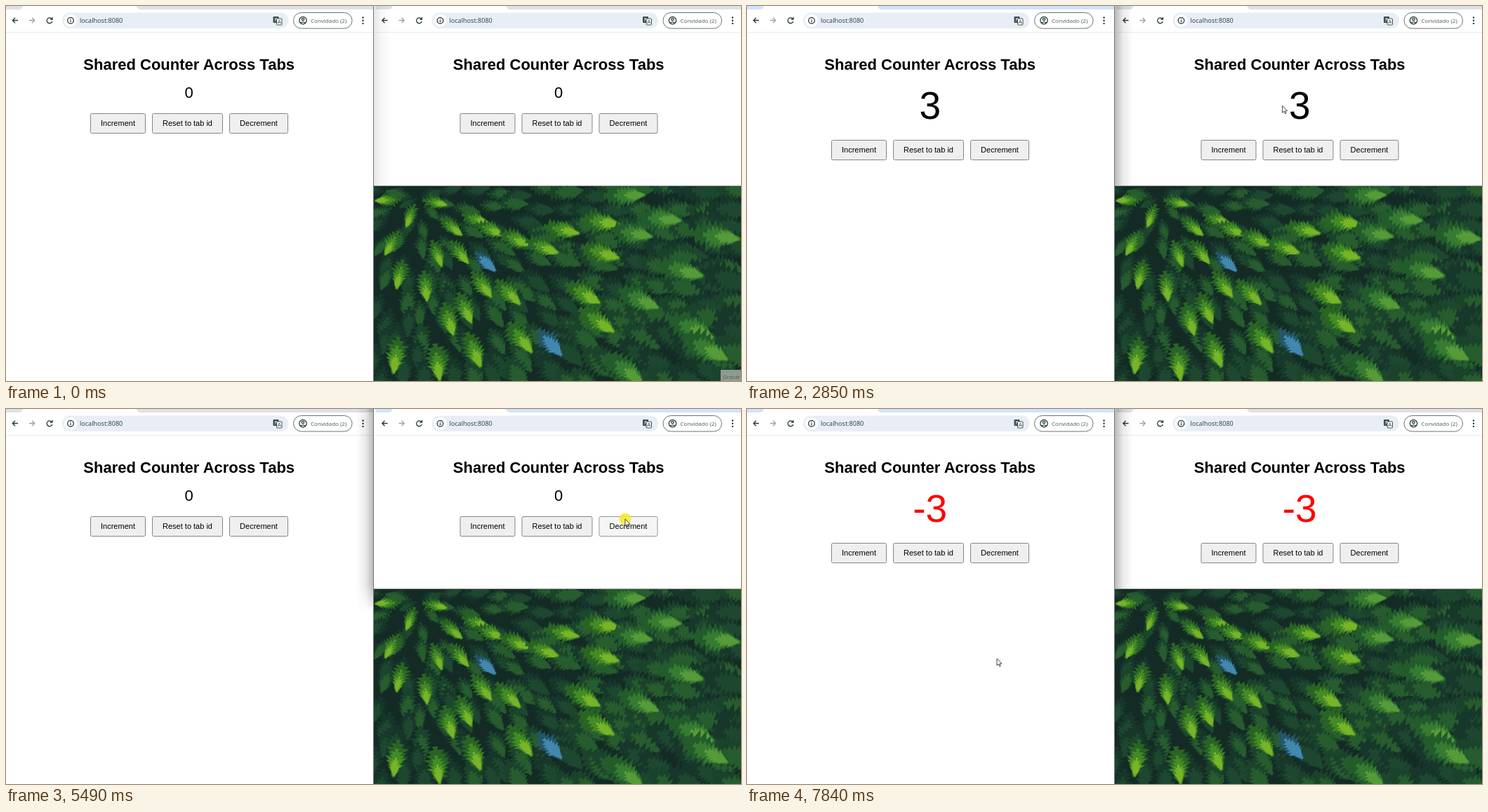
An HTML page for the animation above (8000 ms loop, 1047x535 px).

```html
<!DOCTYPE html>
<html lang="en">
<head>
<meta charset="utf-8">
<title>Shared Counter Across Tabs</title>
<style>
html, body { margin: 0; width: 100%; height: 100%; overflow: hidden; background: #fff }
svg { display: block }
.page { font-family: "Liberation Sans", Arial, sans-serif; text-anchor: middle }
.bar { font-family: "Open Sans", "Noto Sans", sans-serif }
.line { fill: none; stroke: #243b37; stroke-width: 1.3 }
.btn rect { fill: #efefef; stroke: #858585 }
.btn.hover rect { fill: #e4e4e4; stroke: #5c5c5c }
.btn.down rect { fill: #f5f5f5; stroke: #9a9a9a }
</style>
</head>
<body>
<svg id="stage" width="1047" height="535" viewBox="0 0 1047 535"></svg>
<script>
const LOOP = 8000, SHIFT = 526.5;
const stage = document.getElementById('stage');
const $ = id => document.getElementById(id);

// Pointer path: time, x, y
const path = [
  [0, 1052, 540], [70, 1036, 522], [480, 94, 205], [820, 136, 174],
  [1700, 136, 174], [2100, 140, 185], [2640, 140, 185], [2850, 762, 142],
  [2980, 853, 172], [3180, 853, 172], [3320, 886, 197], [3800, 886, 195],
  [3910, 886, 160], [4050, 886, 160], [4240, 902, 192], [4440, 904, 206],
  [4500, 904, 206], [4750, 888, 174], [5150, 888, 174], [5420, 882, 157],
  [5640, 882, 157], [5890, 888, 178], [6230, 888, 178], [6490, 889, 200],
  [7220, 889, 200], [7600, 356, 356], [8000, 356, 356]
];
// Button presses: down, up, counter change
const presses = [
  [890, 1020, 1], [1560, 1690, 1], [2300, 2440, 1], [3320, 3450, -1],
  [4240, 4370, -1], [4820, 4940, -1], [5480, 5620, -1], [6050, 6160, -1],
  [6750, 6890, -1], [7680, 7800, 0]
];
const hovers = {
  L0: [[660, 2710]],
  R2: [[3230, 3860], [4110, 4520], [4640, 7290]]
};
const within = (t, spans) => spans.some(([a, b]) => t >= a && t < b);

function pointerAt(t) {
  const i = Math.max(1, path.findIndex(p => p[0] > t));
  const [t0, x0, y0] = path[i - 1], [t1, x1, y1] = path[i];
  const k = (t - t0) / (t1 - t0);
  return [x0 + (x1 - x0) * k, y0 + (y1 - y0) * k];
}

function browser(id, x) {
  const buttons = [['Increment', 120.5, 78], ['Reset to tab id', 208.5, 100], ['Decrement', 318.5, 83]];
  return `<g transform="translate(${x})">
  <g id="strip${id}"><path d="M0 0H25Q23 0 23 2T19 5H0zM186 0H523V5H192Q187 5 186 0z"/></g>
  <path d="M0 37.5H523" stroke="#e8eaed"/>
  <g class="bar">
    <path class="line" d="M17 20.5H9.5M13 16.8L9.3 20.5L13 24.2"/>
    <path class="line" style="stroke:#9aa5a3" d="M33 20.5H40.5M37 16.8L40.7 20.5L37 24.2"/>
    <path class="line" d="M65.3 18.6A3.9 3.9 0 1 0 65.8 22M66 16V19.2H62.8"/>
    <rect x="80" y="9.5" width="322.5" height="22.5" rx="11.2" fill="#e9eef6"/>
    <circle cx="92" cy="20.7" r="9" fill="#fff"/>
    <circle class="line" cx="92" cy="20.7" r="4.3"/>
    <path class="line" d="M92 20.2V23.1M92 18.2V19.3"/>
    <text x="105" y="24.3" font-size="9.1" fill="#24403a">localhost:8080</text>
    <rect x="380.5" y="15" width="8" height="9" rx="1" fill="#3c504c"/>
    <rect x="385.5" y="18" width="7.5" height="9" rx="1" fill="#fff" stroke="#3c504c"/>
    <path d="M382.5 18.2H386.5M384.5 17V18.2Q384.5 21 382.5 22" fill="none" stroke="#fff" stroke-width=".8"/>
    <path d="M387 25L389.3 20L391.6 25M388 23.5H390.6" fill="none" stroke="#3c504c" stroke-width=".8"/>
    <rect x="409.5" y="9.5" width="83.5" height="22.5" rx="11.2" fill="#fff" stroke="#69756f"/>
    <g class="line"><circle cx="423" cy="20.6" r="5.2"/><circle cx="423" cy="19" r="1.7"/>
      <path d="M419.3 24.3Q423 21.4 426.7 24.3"/></g>
    <text x="434" y="23.7" font-size="8" fill="#4c5a56">Convidado (2)</text>
    ${[16.5, 20.7, 24.9].map(y => `<circle cx="508.5" cy="${y}" r="1.2" fill="#243b37"/>`).join('')}
  </g>
  <g class="page">
    <text x="260.7" y="91.3" font-size="22" font-weight="bold">Shared Counter Across Tabs</text>
    <text id="num${id}" x="260.7"></text>
    <g id="row${id}">${buttons.map(([label, bx, w], i) => `<g class="btn" id="${id}${i}">
      <rect x="${bx}" y="153.5" width="${w}" height="28" rx="2"/>
      <text x="${bx + w / 2}" y="170.7" font-size="11">${label}</text></g>`).join('')}</g>
  </g></g>`;
}

// Simplified forest seen from above: flat conifers leaning away from one point
function forest() {
  let seed = 11;
  const rnd = () => (seed = seed * 16807 % 2147483647) / 2147483647;

  function crown(x, y, len, width, angle, fill) {
    const n = 9, left = [], right = [];
    for (let i = 0; i <= n; i++) {
      const u = i / n, w = width * Math.sin(Math.PI * (.08 + .92 * u ** .8));
      const px = len * (u - .5);
      for (const [side, s] of [[left, -1], [right, 1]]) {
        const jag = .8 + rnd() * .4;
        side.push([px - 3, s * w * jag], [px + 2, s * w * jag * .55]);
      }
    }
    const pts = left.concat(right.reverse()).map(p => p.map(v => v.toFixed(1)).join()).join(' ');
    return `<polygon points="${pts}" fill="${fill}" transform="translate(${x} ${y}) rotate(${angle})"/>`;
  }

  function tree(x, y, size, colors) {
    const dx = x - 585, dy = y - 275, a = Math.atan2(dy, dx);
    const len = size * (30 + Math.hypot(dx, dy) * .085), wid = len * .3;
    return colors.map((c, i) => {
      const k = 1 - i * .27, off = len * .1 * i;
      return crown(x + Math.cos(a) * off, y + Math.sin(a) * off, len * k, wid * k, a * 180 / Math.PI, c);
    }).join('');
  }

  let out = '';
  for (let y = 262; y < 545; y += 27)
    for (let x = 530; x < 1060; x += 34)
      out += tree(x + rnd() * 24 - 12, y + rnd() * 20 - 10, .85 + rnd() * .3,
        rnd() < .5 ? ['#17372a', '#1d482f'] : ['#1b432b', '#275c2e']);

  const lit = [
    [541, 277], [548, 341], [614, 281], [575, 302], [637, 317], [672, 305], [692, 320],
    [648, 354], [728, 334], [680, 400], [718, 411], [655, 434], [560, 386], [598, 403],
    [632, 450], [555, 502], [615, 512], [668, 494], [735, 476], [825, 412], [850, 353],
    [850, 309], [895, 325], [845, 451], [905, 420], [980, 461], [965, 378], [935, 304],
    [1015, 329], [885, 521], [767, 345], [615, 356], [795, 320], [885, 270], [1000, 490]
  ];
  for (const [x, y] of lit)
    out += tree(x, y, 1.1, x < 860 ? ['#2a6424', '#438b25', '#78b428'] : ['#235b2b', '#367b31', '#569b38']);
  for (const [x, y] of [[685, 367], [777, 483]])
    out += tree(x, y, .95, ['#24566a', '#4288ae']);
  return `<svg x="524" y="257" width="523" height="278" viewBox="524 257 523 278">
    <rect x="524" y="257" width="523" height="278" fill="#142b25"/>${out}</svg>`;
}

const fade = (id, x1, x2) => `<linearGradient id="${id}" x1="${x1}" x2="${x2}">
  <stop stop-color="#000" stop-opacity=".27"/><stop offset=".45" stop-color="#000" stop-opacity=".08"/>
  <stop offset="1" stop-color="#000" stop-opacity="0"/></linearGradient>`;

stage.innerHTML = `<defs>${fade('toRight', 0, 1)}${fade('toLeft', 1, 0)}
  <linearGradient id="down" x2="0" y2="1"><stop offset=".87" stop-color="#fff"/><stop offset="1"/></linearGradient>
  <mask id="soft"><rect x="490" width="40" height="290" fill="url(#down)"/></mask></defs>
  <rect width="1047" height="535" fill="#fff"/>
  ${browser('L', 0)}${browser('R', SHIFT)}
  <rect id="shadeR" x="524" width="26" height="257" fill="url(#toRight)"/>
  <rect id="shadeL" x="499" width="24" height="290" fill="url(#toLeft)" mask="url(#soft)"/>
  ${forest()}
  <path d="M523.5 0V535" stroke="#737776"/><path d="M524 256.5H1047" stroke="#a4aaa7"/>
  <g id="record"><rect x="1018" y="519" width="29" height="16" fill="#a3a8a0" opacity=".85"/>
    <text class="bar" x="1021" y="531.5" font-size="8" fill="#555d58">Gravar</text></g>
  <circle id="spot" r="8.5" fill="#f5e928" opacity=".85"/>
  <path id="pointer" d="M0 0V10L2.3 8L3.9 11.4L5.3 10.8L3.8 7.5L7 7.2z" fill="#fff" stroke="#333" stroke-width=".9"/>`;

function draw(t) {
  const count = presses.reduce((n, [, up, d]) => t >= up ? n + d : n, 0);
  const size = Math.abs(count);
  const press = presses.find(([a, b]) => t >= a && t < b);
  const focus = t < 950 ? '' : t >= 3320 && t < 7680 ? 'R' : 'L';
  const [x, y] = pointerAt(t);

  for (const id of ['L', 'R']) {
    const num = $('num' + id);
    num.textContent = count;
    num.setAttribute('font-size', 22 + 11 * size);
    num.setAttribute('y', 130.6 + 10 * size);
    num.setAttribute('fill', count < 0 ? '#f00' : '#000');
    $('row' + id).setAttribute('transform', `translate(0 ${Math.round(12.65 * size)})`);
    $('strip' + id).setAttribute('fill', focus === id ? '#d3e3fd' : '#dee2e7');
  }
  for (const id in hovers) {
    const over = within(t, hovers[id]);
    $(id).setAttribute('class', 'btn' + (over ? press ? ' down' : ' hover' : ''));
  }
  $('shadeR').setAttribute('opacity', focus === 'R' ? 0 : focus ? 1 : .35);
  $('shadeL').setAttribute('opacity', focus === 'R' ? 1 : 0);
  $('record').setAttribute('opacity', t < 140 ? 1 : 0);
  $('spot').setAttribute('opacity', press ? .85 : 0);
  for (const id of ['spot', 'pointer'])
    $(id).setAttribute('transform', `translate(${x} ${y})`);
}

const start = performance.now();
function tick() {
  draw((performance.now() - start) % LOOP);
  requestAnimationFrame(tick);
}
tick();
</script>
</body>
</html>
```
